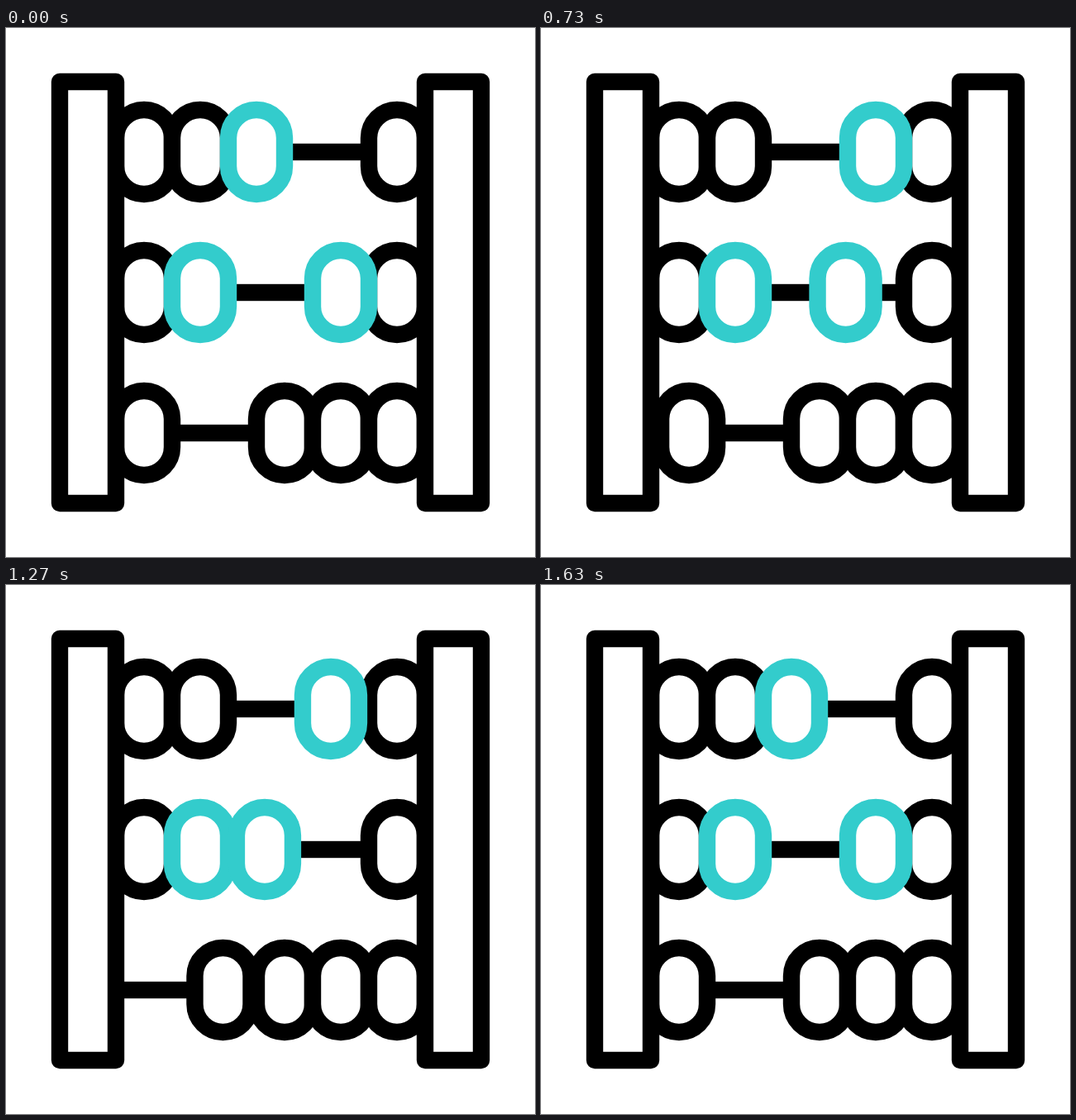
Animation, 640 px wide and 640 px high, one loop 1.67 s. Source, as an HTML page with a canvas:

```html
<!DOCTYPE html>
<html lang="en">
<head>
<meta charset="utf-8">
<title>Abacus</title>
<style>
html, body { margin: 0; width: 100%; height: 100%; overflow: hidden; background: #fff; }
canvas { display: block; width: 640px; height: 640px; }
</style>
</head>
<body>
<canvas id="stage" width="640" height="640"></canvas>
<script>
const ctx = document.getElementById('stage').getContext('2d');
const LOOP = 1670, FPS = 30;
const BLACK = '#000', TEAL = '#33cccc';

// Resting beads are x positions; the mover slides out and back (ticks at 30 per second).
const rows = [
  { y: 150, black: [167, 235, 473], teal: [],
    mover: { color: TEAL, from: 303, to: 405, out: [13, 22], back: [35, 49] } },
  { y: 320, black: [167, 473], teal: [235],
    mover: { color: TEAL, from: 405, to: 301.5, out: [16, 31], back: [35.5, 47.6] } },
  { y: 490, black: [337, 405, 473], teal: [],
    mover: { color: BLACK, from: 167, to: 269.5, out: [19, 33], back: [36, 48.5] } }
];

function ease(tick, [start, end]) {
  const x = Math.min(1, Math.max(0, (tick - start) / (end - start)));
  return x * x * (3 - 2 * x);
}

function position(m, tick) {
  return m.from + (m.to - m.from) * (ease(tick, m.out) - ease(tick, m.back));
}

function outline(color) {
  ctx.strokeStyle = color;
  ctx.fill();
  ctx.stroke();
}

function bead(x, y, color) {
  ctx.beginPath();
  ctx.arc(x, y - 17, 34, Math.PI, 0);
  ctx.arc(x, y + 17, 34, 0, Math.PI);
  ctx.closePath();
  outline(color);
}

function post(x) {
  ctx.beginPath();
  ctx.rect(x, 65, 68, 510);
  outline(BLACK);
}

function drawRow(row, tick) {
  const { y, mover } = row;
  ctx.fillStyle = BLACK;
  ctx.fillRect(133, y - 10.2, 374, 20.4);
  ctx.fillStyle = '#fff';
  row.black.forEach(x => bead(x, y, BLACK));
  row.teal.forEach(x => bead(x, y, TEAL));
  bead(position(mover, tick), y, mover.color);
}

function draw(ms) {
  const tick = Math.floor((ms % LOOP + 5) * FPS / 1000);
  ctx.fillStyle = '#fff';
  ctx.fillRect(0, 0, 640, 640);
  ctx.lineWidth = 20.4;
  ctx.lineJoin = 'round';
  rows.forEach(row => drawRow(row, tick));
  post(65);
  post(507);
}

let start;
function loop(now) {
  start ??= now;
  draw(now - start);
  requestAnimationFrame(loop);
}
draw(0);
requestAnimationFrame(loop);
</script>
</body>
</html>
```
